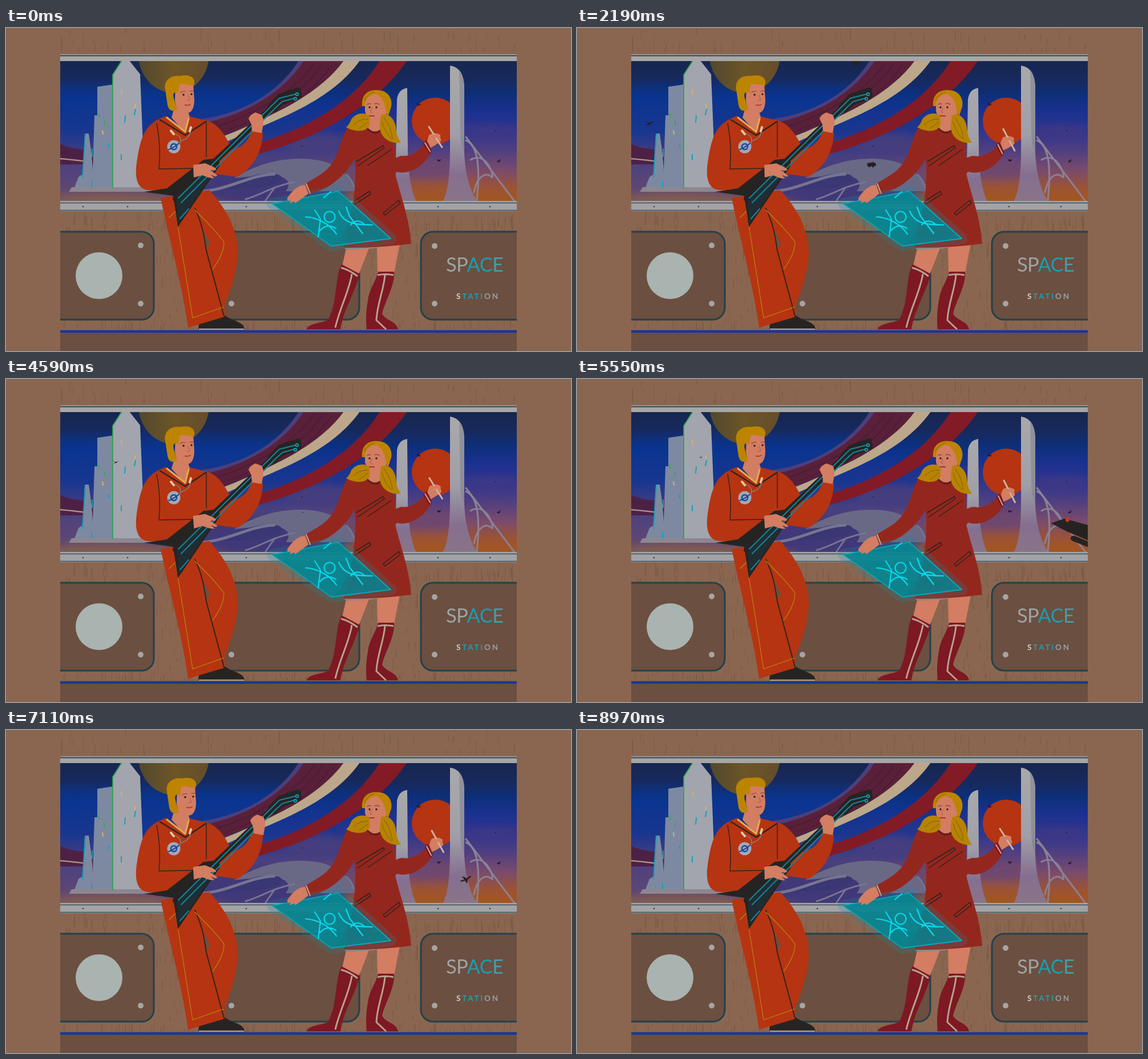
Recreate the animation shown at these times as an HTML page. Size 990 by 566 pixels, loop 9000 ms.

```html
<!DOCTYPE html>
<html lang="en">
<head>
<meta charset="utf-8">
<title>Space station</title>
<style>
html,body{margin:0;width:100%;height:100%;overflow:hidden;background:#8a6650}
svg{display:block;width:990px;height:566px}
.ln{fill:none;stroke-linecap:round;stroke-linejoin:round}
text{font-family:Lato,sans-serif}
</style>
</head>
<body>
<svg viewBox="0 0 990 566" xmlns="http://www.w3.org/2000/svg">
<defs>
  <clipPath id="stage"><rect x="95" y="0" width="800" height="566"/></clipPath>
  <clipPath id="window"><rect x="95" y="57" width="800" height="247"/></clipPath>
  <linearGradient id="sky" x2="0" y2="1">
    <stop stop-color="#17264f"/><stop offset=".15" stop-color="#172a5f"/><stop offset=".24" stop-color="#0d2f78"/>
    <stop offset=".36" stop-color="#1a318f"/><stop offset=".5" stop-color="#30358d"/><stop offset=".64" stop-color="#503f80"/>
    <stop offset=".78" stop-color="#7a4b6b"/><stop offset=".9" stop-color="#9b5334"/><stop offset="1" stop-color="#a4561d"/>
  </linearGradient>
  <linearGradient id="leftSky" x2="0" y2="1">
    <stop offset=".12" stop-color="#0a3590" stop-opacity="0"/><stop offset=".28" stop-color="#0a3590"/>
    <stop offset=".5" stop-color="#18368f"/><stop offset=".7" stop-color="#4a4080"/><stop offset="1" stop-color="#66496f"/>
  </linearGradient>
  <linearGradient id="leftFade"><stop stop-color="#fff"/><stop offset=".6" stop-color="#fff"/><stop offset="1" stop-color="#000"/></linearGradient>
  <mask id="leftMask"><rect x="95" y="57" width="600" height="247" fill="url(#leftFade)"/></mask>
  <linearGradient id="ochre"><stop stop-color="#51482f"/><stop offset=".5" stop-color="#6d5527"/><stop offset="1" stop-color="#654d2c"/></linearGradient>
  <linearGradient id="tower" x2="0" y2="1">
    <stop stop-color="#a9a9ab"/><stop offset=".5" stop-color="#a09fa8"/><stop offset=".8" stop-color="#856f90"/><stop offset="1" stop-color="#8a7488"/>
  </linearGradient>
  <filter id="soft" x="-30%" y="-60%" width="160%" height="220%"><feGaussianBlur stdDeviation="7"/></filter>
</defs>

<rect width="990" height="566" fill="#8a6650"/>
<g id="grain" class="ln" stroke="#735440"/>

<g clip-path="url(#stage)">
  <g fill="#6b4f40" stroke="#23414a" stroke-width="3">
    <rect x="60" y="357" width="199" height="154" rx="21"/>
    <rect x="360" y="357" width="259" height="154" rx="21"/>
    <rect x="727" y="357" width="210" height="154" rx="21"/>
  </g>
  <g id="screws" fill="#a6a4a4"/>
  <circle cx="163" cy="434" r="41" fill="#a9b3b0"/>
  <text x="771" y="427" font-size="34.5" letter-spacing="-.6" fill="#9da3a5">SP<tspan fill="#1b9daf">AC</tspan><tspan fill="#449ca6">E</tspan></text>
  <text x="789" y="475" font-size="13.5" font-weight="700" letter-spacing="2.8" fill="#d4cfc6">S<tspan fill="#219fb0">TATI</tspan><tspan fill="#969ea2">ON</tspan></text>
  <rect x="95" y="532" width="800" height="34" fill="#6b4f40"/>
  <rect x="95" y="529.5" width="800" height="4.5" fill="#163895"/>
</g>

<g clip-path="url(#window)">
  <rect x="95" y="57" width="800" height="247" fill="url(#sky)"/>
  <rect x="95" y="57" width="600" height="247" fill="url(#leftSky)" mask="url(#leftMask)"/>
  <g filter="url(#soft)">
    <ellipse cx="470" cy="276" rx="135" ry="36" fill="#403978"/>
    <ellipse cx="545" cy="205" rx="55" ry="20" fill="#443c7e"/>
    <ellipse cx="850" cy="180" rx="50" ry="7" fill="#423984"/>
    <ellipse cx="735" cy="250" rx="60" ry="12" fill="#6d4770"/>
    <ellipse cx="180" cy="306" rx="120" ry="18" fill="#7f5c51"/>
  </g>
  <path d="M95 203C112 212 140 214 165 215V239H95Z" fill="#4d2146"/>
  <path d="M95 229Q120 231 150 235" class="ln" stroke="#a99382" stroke-width="2.5"/>
  <ellipse cx="294" cy="46" rx="62" ry="68" fill="url(#ochre)"/>
  <path d="M513 57H528C492 112 425 153 345 171L345 159C420 148 480 110 513 57Z" fill="#4b3f7c"/>
  <path d="M522 57H592C565 96 525 122 475 147 435 167 400 183 365 194L345 190V167C430 149 489 108 522 57Z" fill="#5a2039"/>
  <g class="ln" stroke="#451d3b" stroke-width="1.5">
    <path d="M540 62C505 112 440 150 365 174M555 62C525 110 465 150 390 178M570 65C540 112 485 148 430 166"/>
  </g>
  <path d="M592 57H620C590 100 542 130 490 154 455 170 420 184 385 200L372 193C415 177 450 160 475 147 525 122 565 94 592 57Z" fill="#bda78a"/>
  <path d="M655 57H703C645 142 535 201 405 230V211C520 185 610 130 655 57Z" fill="#821b26"/>

  <g fill="#7d89a0">
    <path d="M187 82V280H151L155 153H160V103L187 99Z"/>
    <path d="M138 185H145L150 222 154 282H119L127 261 135 256Z"/>
  </g>
  <path d="M203 57H216L235 81 243 280H187V82Z" fill="#a2a5ae"/>
  <path d="M115 279H265V287H110Z" fill="#8d8690"/>
  <path d="M187 280V82L203 57" class="ln" stroke="#2ba84b" stroke-width="1.8"/>
  <g class="ln" stroke-width="2">
    <path d="M139 186 134 262M151 212V225M150 269V278M209 154 208 165M227 142 225 152M202 222V231M180 203V208" stroke="#16a0b8"/>
    <path d="M163 150V156M172 163V170" stroke="#32aa50"/>
    <path d="M202 108 203 115M226 134V141M169 180 170 186" stroke="#d7b06b"/>
  </g>

  <path d="M400 263C445 234 495 226 535 230C575 234 601 253 613 286H490C505 268 485 255 450 258Z" fill="#696986"/>
  <path d="M385 284C410 262 450 250 478 257C495 266 470 278 430 281Z" fill="#393774"/>
  <g class="ln" stroke="#767491">
    <path d="M330 287C390 286 422 258 470 256" stroke-width="5"/>
    <path d="M420 300C447 292 468 277 505 270M455 302 471 279M597 257Q611 270 615 300" stroke-width="3"/>
  </g>
  <circle cx="752" cy="163" r="41" fill="#b53412"/>
  <path d="M778 66C794 68 802 81 803 101V220C805 260 814 286 826 304H765C776 285 778 246 778 215Z" fill="url(#tower)"/>
  <path d="M794 73C802 82 803 95 803 115V218Q796 205 796 180Z" fill="#777985" opacity=".45"/>
  <path d="M703 105C692 107 687 113 685 125L682 304H719C707 280 704 239 704 210Z" fill="url(#tower)"/>
  <g class="ln" stroke="#8b8094" stroke-width="3">
    <path d="M806 191 893 306M806 197C825 205 832 237 825 302M814 231C837 217 854 248 852 262C840 250 825 261 820 288"/>
  </g>
  <g id="birds" fill="#2b1c25"/>
  <g id="leftBird"><path d="M-9-4-1 0 9-3 1 3-7 5-2 1Z" fill="#251f28"/></g>
  <g id="craft"><path d="M-9 3-4-4 8-7 9-1 3 1 2 5-5 7Z" fill="#25211f"/><circle cx="4" cy="-3" r="1" fill="#b43417"/></g>
  <g id="rover"><path d="M-8-3 4-5 8-2 7 3 5 1 3 5 0 2-4 4-7 2Z" fill="#25211f"/></g>
  <g id="plane"><path d="M-9 3-2 1-6-4-3-4 2-1 9-6 10-4 4 1 3 7 1 7 0 3-8 5Z" fill="#29211f"/></g>
  <g id="ship">
    <g transform="translate(-587 -80)">
      <g class="ln" stroke="#252322">
        <path d="M621 103 655 117M756 168 846 204" stroke-width="8"/>
        <ellipse cx="765" cy="181" rx="14" ry="10" stroke-width="6" transform="rotate(-25 765 181)"/>
      </g>
      <path d="M587 80 607 73C632 79 660 89 690 92 708 90 722 82 738 82 771 84 801 98 826 119 851 139 874 160 883 178Q882 184 875 183L805 176C760 168 715 152 682 134 668 116 640 104 612 93Z" fill="#252322"/>
      <g class="ln" stroke-width="1.5">
        <path d="M735 88C765 98 780 123 783 148M800 102C842 122 866 150 879 178" stroke="#ad351b"/>
        <path d="M752 91C778 101 805 131 833 168M783 133 797 166 833 169" stroke="#9b9a9e"/>
        <path d="M690 108C708 92 730 86 759 91M697 124 778 152M765 89C812 106 841 133 873 177" stroke="#263a8c"/>
      </g>
      <g fill="#c63b19"><circle cx="612" cy="75" r="3"/><circle cx="846" cy="205" r="3"/></g>
    </g>
  </g>
</g>

<g clip-path="url(#stage)">
  <rect x="95" y="46" width="800" height="12" fill="#a7a7a6"/>
  <path d="M95 48.5H895" stroke="#304651" stroke-width="2"/>
  <rect x="95" y="303" width="800" height="18" fill="#a3a3a5"/>
  <path d="M95 306.5H895M95 319.5H895" stroke="#3c5060" stroke-width="1.6"/>
  <g id="rivets" fill="#344047"/>
</g>

<g id="man">
  <path d="M338 517 384 504C397 514 417 514 418 528H337Z" fill="#262422"/>
  <path d="M338 527.5H417" stroke="#c5b9a9" stroke-width="1.5"/>
  <path d="M271 298 356 284C389 319 407 358 406 396C405 430 391 464 383 485V506L319 525C309 450 287 376 271 298Z" fill="#b63411"/>
  <path d="M344 350 357 376 350 391Z" fill="#6b4f40"/>
  <path d="M331 316C345 345 348 370 351 390L382 505" class="ln" stroke="#29231f" stroke-width="1.8"/>
  <g class="ln" stroke="#b98b10" stroke-width="1.1">
    <path d="M297 321 327 508 381 489M331 319C352 340 369 357 382 375C382 390 373 408 362 423M286 332 298 320"/>
  </g>
  <path d="M281 154C246 166 237 186 230 229C225 259 228 278 244 283C261 287 282 282 301 275L370 256 405 261C435 245 450 212 450 183L430 179Q427 196 412 207L396 214C388 194 374 168 351 162L322 155 306 174Z" fill="#b63411"/>
  <path d="M264 167C269 192 271 217 268 247L328 246M351 164V226" class="ln" stroke="#30241e" stroke-width="1.4"/>
  <path d="M296 136 290 157 314 184 322 156 318 143Z" fill="#d37d62"/>
  <path d="M282 157 314 182 320 159" class="ln" stroke="#dbac58" stroke-width="3"/>
  <path d="M270 161 314 188 350 164" class="ln" stroke="#30241e" stroke-width="2.5"/>
  <path d="M296 185Q309 190 305 202M323 180Q323 193 306 198" class="ln" stroke="#7f8b91" stroke-width="1.3"/>
  <path d="M289 180 294 186M324 174 322 181" class="ln" stroke="#e2c9a8" stroke-width="4"/>
  <circle cx="294" cy="208" r="11.5" fill="#a4a8b6"/>
  <circle cx="294" cy="208" r="5" class="ln" stroke="#17489b" stroke-width="2.5"/>
  <path d="M285 213C291 211 300 205 303 202" class="ln" stroke="#17489b" stroke-width="2"/>
  <g id="manHead">
    <path d="M297 97H328L330 126C330 142 324 151 314 149C302 147 297 138 296 127Z" fill="#d37d62"/>
    <path d="M279 108C276 91 290 82 305 84C323 80 334 88 329 101C318 99 309 97 304 99L302 114C297 109 291 113 294 123L300 143C291 148 285 144 283 135Z" fill="#bd8400"/>
    <g class="ln" stroke="#7a4a2e" stroke-width="1.2"><path d="M306 113Q310 110 314 111M322 111Q326 109 329 111"/></g>
    <g fill="#29211f"><circle cx="311" cy="117" r="1.8"/><circle cx="325" cy="116" r="1.7"/></g>
    <path d="M319 118 322 126 317 127" class="ln" stroke="#a95c49"/>
    <path d="M314 135Q319 136 323 134" class="ln" stroke="#a53b2e" stroke-width="1.8"/>
  </g>
  <path d="M242 287 282 281 346 231 374 228 374 242 301 349 293 294Z" fill="#262423"/>
  <path d="M297 299 466 139M463 139 480 120 512 109 513 119 483 130 470 143" class="ln" stroke="#262423" stroke-width="10"/>
  <path d="M299 302 302 343 369 245 344 257Z" fill="#202d32"/>
  <path d="M302 298 479 123 507 116M307 306 474 138 484 129 505 123M305 334 320 317" class="ln" stroke="#12879b" stroke-width="2"/>
  <g fill="none" stroke="#16a2b6" stroke-width="1.6"><circle cx="510" cy="116" r="2.4"/><circle cx="507" cy="124" r="2.4"/></g>
  <path id="strum" d="M328 240 349 237 363 243C372 249 369 250 358 249L370 258C369 262 363 259 359 257L365 263C357 264 350 260 344 258L329 262Z" fill="#d37d62"/>
  <path id="fret" d="M431 181 430 169 425 159Q427 152 437 148L448 152Q452 159 451 168L448 184Z" fill="#d37d62"/>
</g>

<g id="girl">
  <path d="M597 382 589 417 618 432 638 381ZM650 381 651 430H680L690 378Z" fill="#d37d62"/>
  <path d="M588 414 620 431C611 465 590 496 586 528H527C529 518 548 518 564 512C582 480 575 440 588 414ZM652 427H680C682 452 663 480 659 501C667 514 684 513 687 528H632C630 512 631 494 634 478C636 457 648 445 652 427Z" fill="#7e1823"/>
  <g class="ln" stroke="#b6a28c" stroke-width="3">
    <path d="M587 420Q602 424 616 435M606 431C602 459 584 493 577 525M651 433Q665 430 679 433M664 433C662 459 650 484 649 512L666 528" stroke-linecap="butt"/>
  </g>
  <path d="M595 386Q620 389 656 382" class="ln" stroke="#9c8a7e" stroke-width="3"/>
  <g id="girlArm">
    <path d="M677 230 693 224C708 226 722 217 734 202L744 218C733 243 704 258 685 252Z" fill="#94271d"/>
    <path d="M730 203 736 196 746 214 742 221Z" fill="#7e1823"/>
    <path d="M734 201 743 216" class="ln" stroke="#c9aa91" stroke-width="2"/>
    <path d="M738 198 741 188Q751 181 761 187L761 199 751 206 744 210Z" fill="#d37d62"/>
    <path d="M741 173 764 209" class="ln" stroke="#cdb39c" stroke-width="3"/>
    <path d="M744 189 757 190 760 196" class="ln" stroke="#d37d62" stroke-width="5"/>
  </g>
  <path d="M633 174C617 170 601 169 595 180C586 198 583 226 564 246C552 258 538 264 524 273L530 291C572 282 597 254 611 229C613 256 612 282 608 304C601 333 596 360 592 385Q650 386 710 378C707 333 691 293 682 255L693 245 692 224 682 228C684 200 674 181 657 176Z" fill="#94271d"/>
  <path d="M526 273 533 290" class="ln" stroke="#c9aa91" stroke-width="2"/>
  <path d="M638 156 633 174Q645 187 657 177V158Z" fill="#d37d62"/>
  <path d="M633 176Q645 189 657 179" class="ln" stroke="#651d20" stroke-width="3"/>
  <g class="ln" stroke="#30211f" stroke-width="1.5">
    <path d="M614 234 661 206 663 210 616 242M634 241 675 213M612 302 637 286 639 291 611 309M661 324 688 302 691 307 664 328Z"/>
  </g>
  <path d="M629 122C635 109 660 110 669 123C671 145 666 160 652 165C640 168 630 156 629 144Z" fill="#d37d62"/>
  <path d="M624 137C622 115 637 107 652 109C669 109 678 124 675 138L669 156C664 144 665 131 657 122C651 115 645 115 640 118C632 122 629 129 629 137Z" fill="#bd8400"/>
  <path d="M637 154C626 146 612 150 605 160Q602 169 596 174C610 182 631 184 637 170Z" fill="#b78300"/>
  <path d="M657 153C668 147 681 158 683 174Q684 191 692 201C669 204 653 188 655 169Z" fill="#b78300"/>
  <g class="ln" stroke="#806010" stroke-width="1"><path d="M634 160Q620 158 609 170M634 165 619 176M663 158Q675 174 677 194M659 164Q662 180 675 194M645 112Q632 116 628 127"/></g>
  <g class="ln" stroke="#7a4a2e" stroke-width="1.2"><path d="M633 134Q636 132 639 133M646 133Q650 131 654 134"/></g>
  <g fill="#29211f"><circle cx="637" cy="139" r="1.7"/><circle cx="649" cy="139" r="1.7"/></g>
  <path d="M641 140 638 147 641 148" class="ln" stroke="#a95c49"/>
  <path d="M637 154 645 154" class="ln" stroke="#a5302c" stroke-width="2"/>
  <g stroke-linejoin="round">
    <path d="M467 308 582 286 674 369 570 382Z" fill="#16899a" fill-opacity=".25" stroke="#18899a" stroke-opacity=".22" stroke-width="20"/>
    <path d="M467 308 582 286 674 369 570 382Z" fill="#07818d" fill-opacity=".86" stroke="#08a9ba" stroke-width="2"/>
    <path d="M582 286 610 311 588 369 570 382 467 308Z" fill="#078995" opacity=".45"/>
  </g>
  <g class="ln" stroke="#08d9ed" stroke-width="2.2">
    <circle cx="567" cy="331" r="9.5"/>
    <path d="M525 331C544 332 566 342 579 361M541 319 551 335 547 366M550 355Q562 341 578 351M557 297 569 287M583 321C591 340 605 345 642 345M596 314 602 330 625 360M604 345Q614 333 627 343"/>
  </g>
  <path d="M524 275C511 275 501 286 493 298Q492 305 499 302L497 307 505 304 507 307 518 299 530 290Z" fill="#d37d62"/>
</g>
</svg>
<script>
const LOOP = 9000, NS = 'http://www.w3.org/2000/svg';
const el = id => document.getElementById(id);
function add(parent, tag, attrs) {
  const node = document.createElementNS(NS, tag);
  for (const key in attrs) node.setAttribute(key, attrs[key]);
  el(parent).append(node);
}

let seed = 41;
const random = () => (seed = seed * 16807 % 2147483647) / 2147483647;
function grain(count, top, bottom) {
  for (let i = 0; i < count; i++) {
    const x = 97 + random() * 796, y = top + random() * (bottom - top);
    const end = Math.min(bottom, y + 5 + random() * 24);
    add('grain', 'path', {
      d: `M${x} ${y}L${x + random() - .5} ${end}`,
      'stroke-width': .6 + random() * .8, opacity: .35 + random() * .5
    });
  }
}
grain(75, 0, 42);
grain(210, 321, 355);
grain(260, 355, 510);
grain(150, 508, 528);

for (const [x, y] of [[236, 381], [236, 483], [395, 483], [751, 382], [751, 483]])
  add('screws', 'circle', { cx: x, cy: y, r: 5 });
for (const x of [135, 213, 421, 757, 848]) add('rivets', 'circle', { cx: x, cy: 313, r: 1.3 });
for (const [x, y, s, a] of [[723, 134, 1, 45], [759, 232, .9, 10], [864, 233, .9, -25], [519, 207, .4, 0], [858, 180, .4, 0]])
  add('birds', 'path', { d: 'M-4-2 0-1 4-3 1 2-3 2Z', transform: `translate(${x} ${y}) rotate(${a}) scale(${s})` });

function sample(keys, t) {
  if (t <= keys[0][0]) return keys[0].slice(1);
  for (let i = 1; i < keys.length; i++) {
    const a = keys[i - 1], b = keys[i];
    if (t <= b[0]) {
      const k = (t - a[0]) / (b[0] - a[0]);
      return a.slice(1).map((v, j) => v + (b[j + 1] - v) * k);
    }
  }
  return keys.at(-1).slice(1);
}

// Each row: time, x, y, scale.
const flights = {
  leftBird: [[0, 68, 184, 1.5], [2190, 127, 166, 1], [3630, 168, 154, .7], [5550, 217, 137, .36], [6090, 231, 134, .3], [7110, 258, 126, 0]],
  craft: [[1900, 513, 45, 1.2], [2190, 492, 58, 1.1], [3630, 390, 129, .95], [4700, 314, 181, .75], [4701, 314, 181, 0]],
  rover: [[0, 470, 330, 3], [960, 490, 278, 2.3], [1890, 513, 249, 1.3], [2190, 516, 240, 1], [3630, 519, 236, .5], [5000, 521, 233, 0]],
  ship: [[5300, 944, 333, 1.22], [5550, 831, 253, 1.15], [6090, 587, 80, 1], [6700, 311, -115, .84]],
  plane: [[6400, 764, 320, 2], [7110, 805, 261, 1], [7470, 826, 256, .9], [8970, 913, 235, .6]]
};
const nod = [[0, 0], [2190, 0], [2610, 3], [3200, 4], [3630, 3.8], [4470, 0], [4500, 0]];
const drawing = [[0, 0], [900, 5.5], [1700, 5.5], [2610, 4], [3630, -9], [4470, 0], [4500, 0]];

function render(t) {
  for (const id in flights) {
    const [x, y, s] = sample(flights[id], t);
    el(id).setAttribute('transform', `translate(${x} ${y}) scale(${s})`);
  }
  const beat = t % 4500, [shift] = sample(nod, beat), [turn] = sample(drawing, beat);
  el('manHead').setAttribute('transform', `translate(${shift} ${shift * .25})`);
  el('fret').setAttribute('transform', `translate(${shift} ${shift * .1})`);
  el('strum').setAttribute('transform', `rotate(${-2 * Math.sin(t * Math.PI / 375)} 328 250)`);
  el('girlArm').setAttribute('transform', `rotate(${turn} 693 248)`);
}

const start = performance.now();
function tick() {
  render((performance.now() - start) % LOOP);
  requestAnimationFrame(tick);
}
render(0);
requestAnimationFrame(tick);
</script>
</body>
</html>
```
